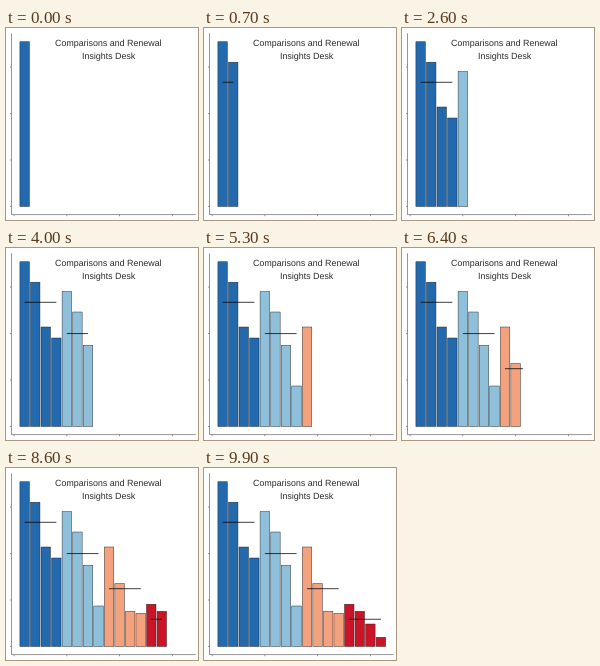
These frames come from a looping animation (192 px wide and 192 px high, 10000 ms). A matplotlib script:

```python
import numpy as np
import matplotlib.pyplot as plt
from matplotlib.animation import FuncAnimation
from matplotlib.patches import Rectangle

plt.rcParams["text.hinting"] = "none"
plt.rcParams["text.hinting_factor"] = 8

SIZE, DPI = 192, 96
PT = 72 / DPI  # points per pixel
FRAMES, INTERVAL = 100, 100

# Bar tops in stage pixels, one row per group
TOPS = np.array([
    [13.7, 34.2, 79.0, 90.0],
    [43.5, 64.0, 97.2, 138.0],
    [79.0, 115.5, 143.3, 145.3],
    [136.2, 143.3, 156.0, 169.3],
])
COLORS = ["#2369ad", "#8fc0db", "#f4a17e", "#ca1528"]
BASE, LEFT, FLOOR = 178.5, 5.5, 186.7
STEP, WIDTH = 10.55, 9.5

COUNT = TOPS.size
STARTS = np.round(np.linspace(0, FRAMES - 1, COUNT))


def bar_x(n):
    """Centre of the n-th bar, counted from one."""
    return 8.1 + STEP * n


fig = plt.figure(figsize=(SIZE / DPI, SIZE / DPI), dpi=DPI, facecolor="white")
ax = fig.add_axes([0, 0, 1, 1])
ax.set_xlim(0, SIZE)
ax.set_ylim(SIZE, 0)
ax.axis("off")


def stroke(xs, ys, color, width, z):
    line, = ax.plot(xs, ys, color=color, lw=width * PT, zorder=z,
                    solid_capstyle="butt", snap=False)
    return line


# Axis lines and ticks
AXIS = "#6a6a6a"
stroke([LEFT, LEFT], [5.3, FLOOR], AXIS, 0.7, 1)
stroke([LEFT, 189.7], [FLOOR, FLOOR], AXIS, 0.7, 1)
for k in range(4):
    y = BASE - 46.5 * k
    x = bar_x(5 * k)
    stroke([LEFT - 1.5, LEFT], [y, y], AXIS, 0.7, 1)
    stroke([x, x], [FLOOR, FLOOR + 1.5], AXIS, 0.7, 1)

for text, y in (("Comparisons and Renewal", 18.5), ("Insights Desk", 31.5)):
    ax.text(102.7, y, text, ha="center", va="baseline", color="#2b2b2b",
            family="Liberation Sans", fontsize=8.9 * PT, zorder=4)

bars = []
for i, top in enumerate(TOPS.flat):
    bar = Rectangle((bar_x(i + 1) - WIDTH / 2, top), WIDTH, BASE - top,
                    facecolor=COLORS[i // 4], edgecolor="#222222",
                    lw=0.45 * PT, joinstyle="miter", snap=False, zorder=2)
    bars.append(ax.add_patch(bar))

means = [stroke([], [], "black", 0.75, 3) for _ in TOPS]


def update(frame):
    for bar, start in zip(bars, STARTS):
        bar.set_visible(frame >= start)
    # The mean lines follow the reveal position along the x axis
    pos = np.interp(frame, STARTS, np.arange(1, COUNT + 1))
    for g, line in enumerate(means):
        first = 4 * g + 1
        head = np.clip(pos, first, first + 3)
        y = TOPS[g].mean()
        line.set_data([bar_x(first), bar_x(head)], [y, y])
        line.set_visible(head > first)
    return bars + means


def reset():
    return update(0)


anim = FuncAnimation(fig, update, frames=FRAMES, init_func=reset,
                     interval=INTERVAL, repeat=True, repeat_delay=0, blit=False)
plt.show()
```
